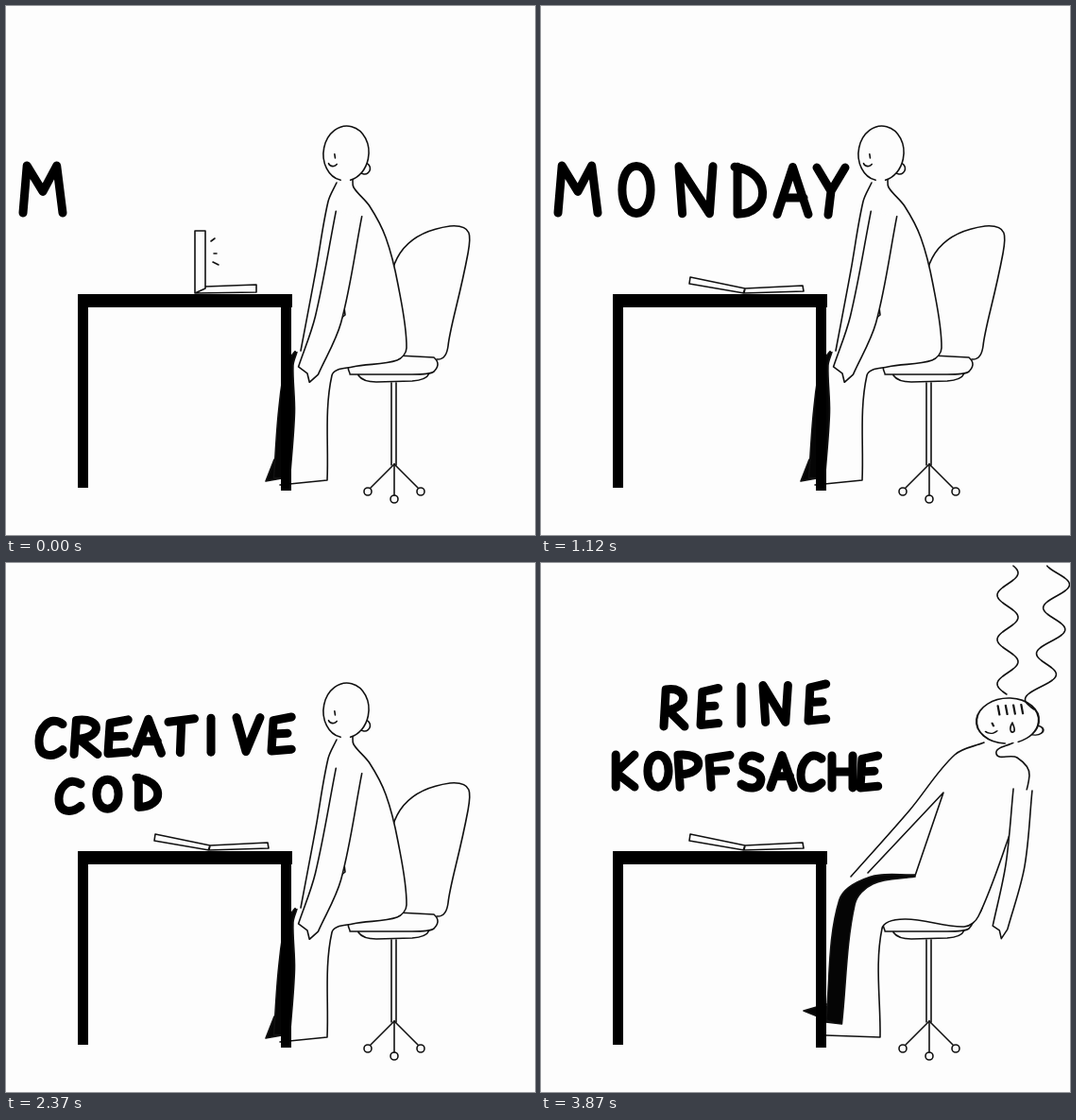
An HTML page with a canvas that plays this animation: 560x560 px, repeating every 4250 ms.

```html
<!DOCTYPE html>
<html lang="en">
<head>
<meta charset="utf-8">
<title>Desk doodle</title>
<style>
html, body { margin: 0; width: 100%; height: 100%; overflow: hidden; background: #fdfdfd; }
canvas { display: block; }
</style>
</head>
<body>
<canvas id="stage" width="560" height="560" role="img" aria-label="Monday. Creative coding. Reine Kopfsache."></canvas>
<script>
const ctx = document.getElementById('stage').getContext('2d');
const PAPER = '#fdfdfd', INK = '#111', LOOP = 4250, TAU = Math.PI * 2;

// Brush letters in a 10 x 10 box, and how much wider than usual some are
const GLYPHS = {
  M: 'M0 10L1 0L5 5.5L8.5 0L10 10', O: 'M5 0C-1.7 0-1.7 10 5 10C11.7 10 11.7 0 5 0Z',
  N: 'M1 10L0 0L9 10L10 0', D: 'M1 0L1 10C13 10 13 1 0 0',
  A: 'M0 10L5 0L10 10M2 6.5L8.5 6.5', Y: 'M0 0L5 5L10 0M5 5L4 10',
  C: 'M10 1C4-2 0 3 0 6C0 11 6 11 10 8.5', R: 'M0 10L1 0C12-1 12 5 2 5.5L10 10',
  E: 'M10 0L1 1L0 10L10 9.5M1 5L8 4.8', T: 'M0 1L10 0M5 .5L4.5 10', I: 'M0 0L0 10',
  V: 'M0 0L4 10L10 0', G: 'M9 1C3-2 0 3 0 6C0 11 9 12 9.5 5.5L5 6',
  P: 'M1 10L0 0C13-1 13 6 1 6', F: 'M10 0L0 1L1 10M1 5L8 4.8',
  S: 'M9 1C4-1 0 1 1 3.5C2 5 9 4.5 9.5 7.5C9 11 3 10.5 0 9',
  K: 'M1 0L1 10M10 0L1 5.5L10 10', H: 'M0 0L0 10M10 0L10 10M0 5L10 5'
};
const WIDE = { M: 1.4, N: 1.2, T: 1.1, A: 1.1, E: .85 };

// Left edge of each letter, top of the first and last one, usual letter size
const word = (text, left, top, end, w, h) => ({ text, left: left.split(' ').map(Number), top, end, w, h });
const MONDAY = word('MONDAY', '18 86 146 205 250 292', 169, 171, 30, 50);
const CREAT = word('CREAT', '22 58 96 132 170', 176, 174, 24, 34);
const CREATIVE = word('CREATIVE', '35 72 108 137 172 217 244 281', 167, 163, 25, 36);
const CODING = word('CODING', '56 96 138 189 207 250', 231, 222, 23, 31);
const REINE = word('REINE', '130 169 212 235 283', 134, 128, 22, 39);
const KOPFSACHE = word('KOPFSACHE', '77 113 145 178 212 243 275 308 338', 203, 204, 22, 34);

const pts = s => s.split(',').map(p => p.trim().split(' ').map(Number));

// Seat, knee, ankle, toe of the near leg; then centre line and toe of the dark one
const TUCKED = { near: pts('367 382,345 391,340 502,290 507'), dark: pts('307 366,300 380,297 430,292 500'), toe: [275, 503] };
const STRETCHED = { near: pts('385 377,361 387,359 502,301 500'), dark: pts('396 331,350 336,324 359,310 487'), toe: [278, 474] };

// head: x, y, half width, half height, tilt; arm: shoulder, elbow, wrist
const pose = (legs, head, back, front, arm, armWidth, fold, hair) =>
  ({ ...legs, head, back: pts(back), front: pts(front), arm: pts(arm), armWidth, fold: pts(fold), hair });
const BENT = '336 313,353 340,338 351';
const POSES = {
  upright: pose(TUCKED, [360, 156, 24, 29, .1],
    '367 182,368 192,385 212,402 245,415 295,424 362,414 375', '350 187,341 207,328 280,312 365',
    '363 220,341 332,320 386', 28, '358 319,359 327,353 332', 0),
  lean: pose(TUCKED, [267, 223, 22, 35, -.5],
    '299 226,304 240,328 237,352 255,395 313,428 364,408 376', '290 256,298 267,303 310,311 370',
    '318 264,321 330,324 400', 25, BENT, 1),
  down: pose(TUCKED, [243, 242, 28, 36, -1.15],
    '277 238,285 233,318 236,355 259,400 312,424 362,410 377', '280 262,296 270,301 310,306 372',
    '319 268,321 340,321 403', 25, BENT, 1),
  desk: pose(TUCKED, [244, 273, 24, 34, -1.75],
    '261 248,280 241,315 231,358 243,400 290,418 355,408 380', '279 273,293 276,297 310,303 372',
    '318 260,321 330,323 426', 25, BENT, 0),
  sit: pose(STRETCHED, [418, 146, 21, 31, .1],
    '434 168,436 192,455 200,473 216,473 270,458 380,438 375', '408 180,383 202,374 250,357 333',
    '460 227,455 310,443 379', 29, '390 217,395 327,360 334', 0),
  recline: pose(STRETCHED, [494, 167, 33, 24, -.05],
    '500 190,482 202,504 206,517 225,497 285,463 374,448 385', '469 190,438 203,390 262,328 332',
    '510 240,502 320,486 386', 20, '346 328,426 243,396 331', 1)
};

const KEYS = [[0, 'upright'], [1, 'upright'], [3, 'lean'], [5, 'down'], [6, 'desk'], [7, 'down'],
  [8, 'lean'], [9, 'upright'], [11, 'upright'], [12, 'down'], [13, 'desk'], [15, 'down'],
  [17, 'lean'], [19, 'upright'], [20, 'sit'], [22, 'sit'], [25, 'recline'], [32, 'recline']];

const mix = (a, b, t) => Array.isArray(a) ? a.map((v, i) => mix(v, b[i], t)) : a + (b - a) * t;

function heading(p, i) {
  const a = p[Math.max(i - 1, 0)], b = p[Math.min(i + 1, p.length - 1)];
  const d = Math.hypot(b[0] - a[0], b[1] - a[1]) || 1;
  return [(b[0] - a[0]) / d, (b[1] - a[1]) / d];
}

// Smooth path through the points; a repeated point makes a corner
function curve(p, join) {
  ctx[join ? 'lineTo' : 'moveTo'](...p[0]);
  for (let i = 0; i < p.length - 1; i++) {
    const [a, b] = [p[i], p[i + 1]], u = heading(p, i), v = heading(p, i + 1);
    const r = Math.hypot(b[0] - a[0], b[1] - a[1]) / 3;
    ctx.bezierCurveTo(a[0] + u[0] * r, a[1] + u[1] * r, b[0] - v[0] * r, b[1] - v[1] * r, ...b);
  }
}

function line(p) {
  ctx.beginPath();
  curve(p);
  ctx.stroke();
}

const pen = d => ctx.stroke(new Path2D(d));

function fill(colour) {
  ctx.fillStyle = colour;
  ctx.fill();
}

// Both edges of a band around a centre line
const edges = (p, widths) => [1, -1].map(side => p.map(([x, y], i) => {
  const [dx, dy] = heading(p, i), r = side * widths[i] / 2;
  return [x - dy * r, y + dx * r];
}));

function drawArm(p, w) {
  const [left, right] = edges(p, [w, w, w * .8]);
  const [x, y] = p[2], [dx, dy] = heading(p, 2);
  ctx.beginPath();
  curve(left);
  ctx.lineTo(x + dx * 3, y + dy * 3);
  ctx.lineTo((x + right[2][0]) / 2 + dx * 11, (y + right[2][1]) / 2 + dy * 11);
  curve(right.reverse(), true);
  fill(PAPER);
  ctx.stroke();
}

function drawDarkLeg(p, toe) {
  const [left, right] = edges(p, [2, 8, 17, 17]), [x, y] = p[3];
  ctx.beginPath();
  curve(left);
  curve(right.reverse(), true);
  ctx.moveTo(x - 8, y - 20);
  ctx.lineTo(...toe);
  ctx.lineTo(x, y);
  fill('#050505');
  ctx.stroke();
}

function drawHead([x, y, rx, ry, tilt], hair) {
  ctx.save();
  ctx.translate(x, y);
  ctx.rotate(tilt);
  ctx.scale(rx / 24, ry / 29);
  ctx.beginPath();
  ctx.arc(21, 14, 6, 0, TAU);
  fill(PAPER);
  ctx.stroke();
  ctx.beginPath();
  ctx.ellipse(0, 0, 24, 29, 0, TAU * .27, TAU * 1.2);
  fill(PAPER);
  ctx.stroke();
  ctx.beginPath();
  ctx.arc(-13, 10, 5, TAU * .08, TAU * .42);
  ctx.stroke();
  pen('M-12 2L-11 6');
  if (hair > .5) for (let i = 0; i < 4; i++) pen(`M${i * 6 - 7} -20l1 12`);
  ctx.restore();
}

function drawPerson(k) {
  const i = KEYS.findIndex((_, j) => k < KEYS[j + 1][0]);
  const [from, a] = KEYS[i], [to, b] = KEYS[i + 1], t = (k - from) / (to - from);
  const p = {};
  for (const part in POSES[a]) p[part] = mix(POSES[a][part], POSES[b][part], t);
  const [seat, knee, ankle, toe] = p.near;
  const body = [...p.back, seat, knee, ankle, ankle, toe];
  ctx.beginPath();
  curve([...p.front].reverse());
  curve(body, true);
  fill(PAPER);
  line(body);
  line(p.front);
  line([p.fold[0], p.fold[1], p.fold[1], p.fold[2]]);
  drawDarkLeg(p.dark, p.toe);
  drawArm(p.arm, p.armWidth);
  drawHead(p.head, p.hair);
  return t < .5 ? a : b;
}

function drawChair() {
  pen('M406 308C405 270 420 240 470 233C495 231 492 245 489 262C480 310 470 340 468 360Q466 375 456 374');
  pen('M364 389Q360 380 364 376L415 370L453 372Q461 379 453 387Q449 390 430 390L364 390M373 391Q378 398 392 398L430 397Q445 396 448 389M408 399V486M413 399V486');
  for (const side of [-1, 0, 1]) {
    const x = 411 + side * 28, y = side ? 514 : 522;
    pen(`M411 485L${x - side * 3} ${y - 4}`);
    ctx.beginPath();
    ctx.arc(x, y, 4, 0, TAU);
    ctx.stroke();
  }
}

function drawLaptop(k, name) {
  if (k < 2) pen('M200 238H211V299L200 304ZM211 297L265 295V303L200 304M217 249L221 246M220 262H223M219 271L225 274');
  else if (name === 'desk') pen('M165 279L218 303H205L160 286ZM217 301L275 285L277 291L214 304Z');
  else pen('M158 287L216 299L215 304L157 294ZM216 299L277 296L278 302L214 304Z');
}

function drawDesk() {
  ctx.fillStyle = '#000';
  ctx.fillRect(76, 305, 227, 14);
  ctx.fillRect(76, 305, 11, 205);
  ctx.fillRect(291, 305, 11, 208);
}

function wisp(top, bottom, x) {
  ctx.beginPath();
  for (let y = top; y <= bottom; y++) ctx.lineTo(x(y), y);
  ctx.stroke();
}

// Two wavering wisps that rise, then a tear
function drawSmoke(k) {
  if (k < 24) return;
  const top = Math.max(3, 100 - 49 * (k - 24)), odd = k % 2;
  wisp(top, 139, y => 494 + 11 * Math.cos(TAU * ((y - 34) / 47 + odd / 2)));
  wisp(top, 155, y => 547 - 25 * (y / 155) ** 2 + (8 + 5 * odd) * Math.cos(TAU * (y - 71) / 48));
  if (k === 31) pen('M499 169C494 178 499 181 501 178C502 175 500 172 499 169');
}

function letter({ text, left, top, end, w, h }, shown = text.length) {
  ctx.lineWidth = 9;
  left.slice(0, Math.max(0, shown)).forEach((x, i) => {
    const c = text[i], y = mix(top, end, i / (text.length - 1));
    const path = new Path2D();
    path.addPath(new Path2D(GLYPHS[c]), new DOMMatrix([w * (WIDE[c] || 1) / 10, 0, 0, h / 10, x, y]));
    ctx.stroke(path);
  });
}

// Typed, deleted, then the next words
function drawText(k) {
  ctx.strokeStyle = '#000';
  if (k < 15) letter(MONDAY, Math.min(Math.max(1, k), 15 - k));
  else if (k < 18) letter(CREAT, Math.round((k - 15) * 2.5));
  else if (k < 26) {
    letter(CREATIVE);
    letter(CODING, (k - 18) * 3);
  } else {
    letter(REINE);
    letter(KOPFSACHE);
  }
}

function draw(k) {
  ctx.fillStyle = PAPER;
  ctx.fillRect(0, 0, 560, 560);
  ctx.strokeStyle = INK;
  ctx.lineWidth = 1.6;
  ctx.lineCap = ctx.lineJoin = 'round';
  drawChair();
  const name = drawPerson(k);
  drawLaptop(k, name);
  drawDesk();
  drawSmoke(k);
  drawText(k);
}

// Eight drawings a second, on whole hundredths; the last one holds
function tick() {
  const hundredths = Math.floor(performance.now() % LOOP / 10);
  draw(Math.min(31, Math.floor((hundredths + .5) / 12.5)));
  requestAnimationFrame(tick);
}
tick();
</script>
</body>
</html>
```
